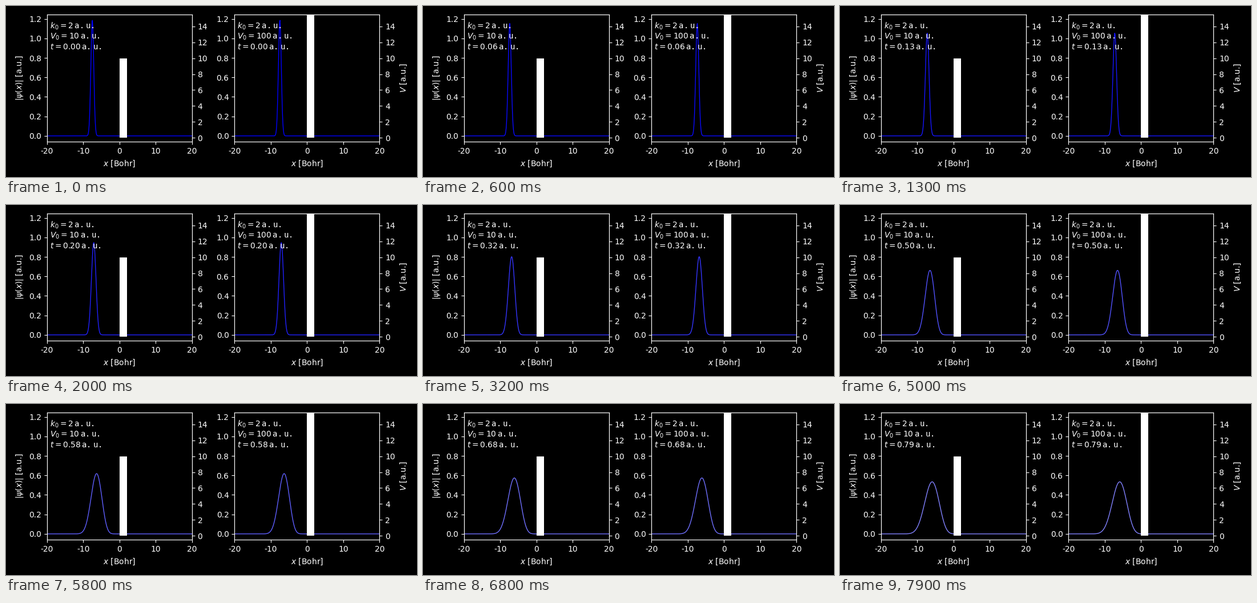
Recreate the animation shown at these times as a matplotlib script. Size 720 by 300 pixels, loop 8000 ms.

```python
import matplotlib.pyplot as plt
import numpy as np
from matplotlib.animation import FuncAnimation

plt.style.use("dark_background")
plt.rcParams.update({
    "font.family": "DejaVu Sans",
    "font.size": 10,
    "axes.unicode_minus": False,
    "axes.labelpad": 5,
})

W, H = 720, 300
FRAMES, INTERVAL = 80, 100
DT = 0.01
X0, K0 = -7.5, 2             # start and momentum of the packet
T_WHITE = 1.55               # time at which the line would turn white

x = np.linspace(-20, 20, 400)
dx = x[1] - x[0]
psi0 = 2 ** 0.25 * np.exp(-np.pi * (x - X0) ** 2 + 1j * K0 * x)


def propagator(v0):
    """Solve the finite-difference Schroedinger equation for a barrier v0."""
    off = np.full(len(x) - 1, -0.5 / dx ** 2)
    barrier = np.where((x >= 0) & (x <= 2), v0, 0)
    ham = np.diag(1 / dx ** 2 + barrier) + np.diag(off, 1) + np.diag(off, -1)
    energy, states = np.linalg.eigh(ham)
    coeff = states.T @ psi0
    return lambda t: np.abs(states @ (coeff * np.exp(-1j * energy * t)))


def panel(left, v0):
    ax = fig.add_axes([left / W, 62 / H, 254.15 / W, 223 / H])
    psi = propagator(v0)
    line, = ax.plot(x, psi(0), lw=1)
    peak = np.abs(psi0).max()
    ax.set(xlim=(-20, 20), ylim=(-0.05 * peak, 1.05 * peak), xlabel="$x$ [Bohr]",
           xticks=range(-20, 21, 10))
    ax_v = ax.twinx()
    ax_v.fill_between([0, 2], 0, v0, color="white", lw=0)
    ax_v.set(ylim=(-0.5, 15.5), yticks=range(0, 15, 2))
    label = ax_v.text(0.02, 0.95, "", va="top", transform=ax_v.transAxes)
    return ax, ax_v, line, label, v0, psi


fig = plt.figure(figsize=(W / 100, H / 100), dpi=100)
panels = [panel(71.75, 10), panel(400.3, 100)]
panels[0][0].set_ylabel(r"$|\psi(x)|$ [a.u.]")
panels[1][1].set_ylabel("$V$ [a.u.]")


def update(i):
    t = i * DT
    shade = min(t / T_WHITE, 1)
    unit = r"\,\mathtt{a{.}u{.}}$"
    for _, _, line, label, v0, psi in panels:
        line.set_ydata(psi(t))
        line.set_color((shade, shade, 1))
        label.set_text("\n".join([f"$k_0 = {K0}{unit}", f"$V_0 = {v0}{unit}",
                                  f"$t = {t:.2f}{unit}"]))
    return []


anim = FuncAnimation(fig, update, frames=FRAMES, interval=INTERVAL,
                     init_func=lambda: [], repeat=True, repeat_delay=0)
plt.show()
```
